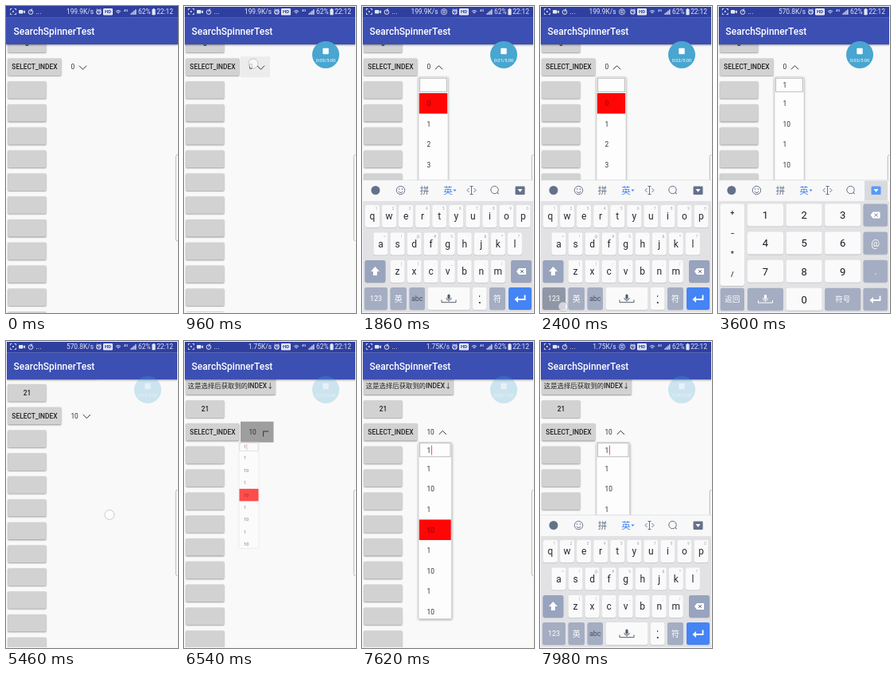
Animation of 216 by 384 pixels, one loop 8000 ms. Source, as an HTML page with a canvas:

```html
<!DOCTYPE html>
<html lang="zh-CN">
<head>
<meta charset="utf-8">
<style>
html, body { margin: 0; width: 100%; height: 100%; overflow: hidden; background: #fafafa; }
canvas { display: block; width: 216px; height: 384px; }
</style>
</head>
<body>
<canvas id="stage"></canvas>
<script>
const W = 216, H = 384, LOOP = 8000;
const canvas = document.getElementById('stage');
const c = canvas.getContext('2d');
const dpr = window.devicePixelRatio || 1;
canvas.width = W * dpr;
canvas.height = H * dpr;

const FONT = 'Roboto, "Noto Sans CJK SC", "Noto Sans CJK", sans-serif';
const SLATE = '#65718a', KEY_GREY = '#a4adc2', KEY_DARK = '#98a3bd', BLUE = '#4484f4';

const ramp = (t, a, b) => Math.min(1, Math.max(0, (t - a) / (b - a)));
const ease = p => 1 - (1 - p) ** 2;
const smooth = p => p * p * (3 - 2 * p);

function rect(x, y, w, h, color) {
  c.fillStyle = color;
  c.fillRect(x, y, w, h);
}
function round(x, y, w, h, r, color) {
  c.fillStyle = color;
  c.beginPath();
  c.roundRect(x, y, w, h, r);
  c.fill();
}
function disc(x, y, r, color) {
  c.fillStyle = color;
  c.beginPath();
  c.arc(x, y, r, 0, 7);
  c.fill();
}
function ring(x, y, r, color, width = 1) {
  c.strokeStyle = color;
  c.lineWidth = width;
  c.beginPath();
  c.arc(x, y, r, 0, 7);
  c.stroke();
}
function line(color, width, ...pts) {
  c.strokeStyle = color;
  c.lineWidth = width;
  c.beginPath();
  for (let i = 0; i < pts.length; i += 2) c.lineTo(pts[i], pts[i + 1]);
  c.stroke();
}
function shape(color, ...pts) {
  c.fillStyle = color;
  c.beginPath();
  for (let i = 0; i < pts.length; i += 2) c.lineTo(pts[i], pts[i + 1]);
  c.fill();
}
// y is the vertical centre of capital letters
function text(s, x, y, size, color, align = 'center', weight = 400) {
  c.font = `${weight} ${size}px ${FONT}`;
  c.fillStyle = color;
  c.textAlign = align;
  c.fillText(s, x, y + size * 0.355);
}
function shadowed(blur, dy, draw) {
  c.save();
  c.shadowColor = 'rgba(0,0,0,.4)';
  c.shadowBlur = blur * dpr;
  c.shadowOffsetY = dy * dpr;
  draw();
  c.restore();
}

function button(label, y, w = 48) {
  shadowed(1.6, 0.8, () => round(2.4, y - 10.8, w, 21.6, 1.2, '#d2d2d2'));
  if (label) text(label, 2.4 + w / 2, y, 8.4, '#222', 'center', 500);
}

function content(t, s) {
  button('这是选择后获取到的INDEX↓', s.scroll + 18.7, 112.5);
  button(s.picked ? '21' : '0', s.scroll + 47.5);
  button('SELECT_INDEX', s.scroll + 76.2, 67);
  for (let i = 0; i < 11; i++) button('', s.scroll + 105 + i * 28.8);
  spinner(t, s);
}

function spinner(t, s) {
  const y = s.scroll + 76.2;
  const press = t < 3000
    ? 0.05 * ramp(t, 900, 940) + 0.3 * ramp(t, 970, 1080) - 0.35 * ramp(t, 1100, 1350)
    : 0.05 * ramp(t, 6360, 6400) + 0.32 * ramp(t, 6430, 6520) - 0.37 * ramp(t, 6560, 6800);
  if (press > 0) rect(71, y - 13, s.width, 26, `rgba(0,0,0,${press})`);
  text(s.picked ? '10' : '0', 81.4, y, 8.4, '#333', 'left');
  const turn = ramp(t, 1040, 1160) - ramp(t, 4340, 4460) + ramp(t, 6450, 6570);
  c.save();
  c.translate(s.picked ? 101.3 : 96.5, y + 0.8);
  c.rotate(turn * Math.PI);
  line('#333', 1, -4.6, -2.3, 0, 2.3, 4.6, -2.3);
  c.restore();
}

function popup(t, s) {
  if (s.open <= 0) return;
  const x = 71, y = s.scroll + 89, w = s.width;
  const closing = t > 4300 && t < 4600;
  const scale = closing ? 1 : 0.5 + 0.5 * s.open;
  const h = Math.min(y + 221, s.kbTop) - y;
  const filtered = t > 2950;
  c.save();
  c.globalAlpha = closing ? s.open : Math.min(1, 3.5 * s.open);
  c.translate(x - 5 * (1 - scale), y);
  c.scale(scale, scale);
  // the shadow ignores the transform, so it is drawn only at full size
  if (scale === 1) shadowed(3, 1, () => rect(0, 0, w, h, '#fdfdfd'));
  else rect(0, 0, w, h, '#fdfdfd');
  c.strokeStyle = '#ccc';
  c.lineWidth = 0.6;
  c.strokeRect(0, 0, w, h);
  c.beginPath();
  c.rect(0, 0, w, h);
  c.clip();
  c.strokeStyle = '#aaa';
  c.lineWidth = 0.8;
  c.strokeRect(1.5, 1.2, w - 3, 17);
  if (filtered) text('1', 10.5, 10, 8.4, '#333', 'left');
  const blinkStart = t > 7600 ? 7600 : 6480;
  if (t > 6000 && Math.floor((t - blinkStart) / 500) % 2 === 0)
    rect(16, 4, 0.9, 12, '#f0406a');
  for (let i = 0; i < 8; i++) {
    const top = 20 + i * 25.6;
    const selected = filtered ? s.picked && i === 3 : i === 0;
    if (selected) rect(0.8, top, w - 1.6, 25.6, '#ff0606');
    const label = filtered ? (i % 2 ? '10' : '1') : String(i);
    text(label, 10.5, top + 13.3, 8.4, selected ? '#701010' : '#333', 'left');
  }
  c.restore();
}

function imeIcon(x, ink) {
  ring(x, 7.2, 3.6, ink, 0.8);
  rect(x - 2, 5.4, 4, 1, ink);
  rect(x - 2, 7.6, 4, 1, ink);
}

function bars(t, s) {
  shadowed(2, 1, () => rect(0, 14.5, W, 33.5, '#3c4fb3'));
  rect(0, 0, W, 14.6, '#2f3f9f');
  text('SearchSpinnerTest', 9.6, 31.6, 12, '#fff', 'left', 500);

  const ink = '#e3e6f5';
  for (const [sx, sy] of [[-1, -1], [1, -1], [1, 1], [-1, 1]])
    line(ink, 0.9, 9 + sx * 3.5, 7 + sy * 1.6, 9 + sx * 3.5, 7 + sy * 3.5, 9 + sx * 1.6, 7 + sy * 3.5);
  disc(9, 7, 1, ink);
  round(16, 5, 5.5, 4.6, 1, ink);
  shape(ink, 21.5, 7.2, 24, 5.2, 24, 9.4);
  ring(31, 7.6, 2.8, ink, 1);
  line(ink, 0.9, 31, 7.6, 32.5, 3.4);
  text('...', 37.5, 7, 9, ink, 'left');

  const speed = t < 3000 ? '199.9K/s' : t < 6000 ? '570.8K/s' : '1.75K/s';
  text(speed, s.typing ? 95.5 : 110, 7.2, 8.4, ink, 'right');
  if (s.typing) imeIcon(103, ink);
  ring(116.5, 7.4, 2.6, ink, 1.2);
  line(ink, 0.8, 116.5, 5.8, 116.5, 7.6, 117.8, 7.6);
  line(ink, 1, 113.4, 5, 114.8, 3.7);
  line(ink, 1, 118.2, 3.7, 119.6, 5);
  round(122, 3, 12, 8.5, 1.2, ink);
  text('HD', 128, 7.3, 6, '#2f3f9f', 'center', 700);
  for (const r of [1.4, 3, 4.5]) {
    c.strokeStyle = ink;
    c.lineWidth = 0.8;
    c.beginPath();
    c.arc(141, 10, r, Math.PI * 1.25, Math.PI * 1.75);
    c.stroke();
  }
  text('4G', 150.5, 5.4, 4.4, ink, 'center', 500);
  for (let i = 0; i < 4; i++) rect(156.5 + i * 1.9, 9 - i * 1.6, 1.3, 1.8 + i * 1.6, ink);
  text('62%', 166, 7.2, 8.4, ink, 'left');
  round(183.4, 4, 4.2, 7.2, 0.6, ink);
  rect(184.6, 3, 1.8, 1.2, ink);
  text('22:12', 210, 7.2, 8.4, ink, 'right');
}

function edgeHandle() {
  c.fillStyle = '#fff';
  c.strokeStyle = '#a5a5a5';
  c.lineWidth = 0.8;
  c.beginPath();
  c.roundRect(213.3, 186, 8, 108, 2.5);
  c.fill();
  c.stroke();
}

function key(x, y, w, color = '#fafafa', label = '', ink = '#252a33', size = 11) {
  round(x, y + 0.8, w, 28, 2.4, '#c2c3c8');
  round(x, y, w, 28, 2.4, color);
  if (label) text(label, x + w / 2, y + 14.2, size, ink);
}
function backspace(x, y) {
  shape('#fff', x - 6, y, x - 3, y - 4, x + 6, y - 4, x + 6, y + 4, x - 3, y + 4);
  line(SLATE, 1, x - 1, y - 1.8, x + 3, y + 1.8);
  line(SLATE, 1, x - 1, y + 1.8, x + 3, y - 1.8);
}
function enter(x, y) {
  line('#fff', 1.8, x + 6, y - 4.5, x + 6, y + 1, x - 4, y + 1);
  shape('#fff', x - 7, y + 1, x - 2.5, y - 3, x - 2.5, y + 5);
}
function mic(x, y, color) {
  round(x - 1.6, y - 5, 3.2, 6.2, 1.6, color);
  c.strokeStyle = color;
  c.lineWidth = 0.9;
  c.beginPath();
  c.arc(x, y - 0.6, 3.2, 0, Math.PI);
  c.stroke();
  line(color, 0.9, x, y + 2.6, x, y + 4);
  line(color, 1, x - 9, y + 2, x - 9, y + 5.2, x + 9, y + 5.2, x + 9, y + 2);
}

function toolbar(t) {
  rect(0, 218, W, 26, '#f8f8f9');
  rect(0, 217.5, W, 0.7, '#d8d9dd');
  disc(17, 230.5, 5.5, SLATE);
  ring(48.5, 230.5, 5.2, SLATE);
  disc(46.6, 229, 0.8, SLATE);
  disc(50.4, 229, 0.8, SLATE);
  c.beginPath();
  c.arc(48.5, 231, 2.6, 0.3, Math.PI - 0.3);
  c.stroke();
  text('拼', 78.5, 230.5, 11.5, SLATE);
  text('英', 108, 230.5, 11.5, BLUE);
  shape(BLUE, 114.5, 229.5, 118.5, 229.5, 116.5, 232);
  line(SLATE, 1, 135.5, 225.5, 139.5, 225.5);
  line(SLATE, 1, 137.5, 225.5, 137.5, 235.5);
  line(SLATE, 1, 135.5, 235.5, 139.5, 235.5);
  line(SLATE, 1, 134.5, 228, 132, 230.5, 134.5, 233);
  line(SLATE, 1, 140.5, 228, 143, 230.5, 140.5, 233);
  ring(166.5, 230, 4.7, SLATE);
  line(SLATE, 1.1, 169.8, 233.4, 171.6, 235.2);
  const pressed = t > 3470 && t < 3680;
  if (pressed) rect(184, 218.5, 29, 25, '#d9dade');
  round(192.5, 225.5, 12, 10.5, 1.2, pressed ? '#5a9af5' : SLATE);
  shape('#fff', 195.5, 229, 201.5, 229, 198.5, 232.8);
}

function letterKeys(t) {
  const rows = [
    ['qwertyuiop', '1234567890', 13, 249],
    ['asdfghjkl', '~!@#%\'&*?', 23.5, 283.5],
    ['zxcvbnm', '()-_:;/', 44.5, 318]
  ];
  for (const [letters, hints, x0, y] of rows)
    [...letters].forEach((letter, i) => {
      const x = x0 + i * 21.05;
      key(x - 9, y, 18);
      text(letter, x, y + 14.2, 12, '#252a33');
      text(hints[i], x + 5, y + 4.5, 4.5, '#9aa1ad');
    });
  key(3.5, 318, 26, KEY_DARK);
  shape('#fff', 16.5, 326, 22, 332, 19, 332, 19, 337, 14, 337, 14, 332, 11, 332);
  key(187, 318, 26, KEY_DARK);
  backspace(200, 332);
  key(3, 352, 29, t > 2330 && t < 2460 ? '#8f97a6' : KEY_GREY, '123', '#fff', 9);
  key(35.5, 352, 20.5, KEY_GREY, '英', '#fff', 10);
  key(59.5, 352, 19.5, KEY_GREY, 'abc', '#4a5162', 9);
  key(82.5, 352, 53);
  mic(109, 365.5, '#555d6b');
  key(139, 352, 17.5);
  text('.', 147.8, 367, 13, '#252a33', 'center', 700);
  text(',', 147.8, 360, 8, '#252a33', 'center', 700);
  key(160, 352, 20, KEY_GREY, '符', '#fff', 10);
  key(184, 352, 29, BLUE);
  enter(198.5, 366);
}

function digitKeys(t) {
  const rowY = i => 247.5 + i * 35.1;
  round(3, 248.5, 30, 102.5, 2.4, '#c2c3c8');
  round(3, 247.5, 30, 102.5, 2.4, '#fafafa');
  [...'+−*/'].forEach((s, i) => text(s, 18, 259 + i * 25.5, 9, '#1c2028', 'center', 500));
  for (let i = 0; i < 9; i++) {
    const hit = i === 0 && t > 2880 && t < 2980;
    key(37 + (i % 3) * 48.6, rowY(Math.floor(i / 3)), 45, hit ? '#d5d6da' : '#fafafa', String(i + 1), '#15181e', 13);
  }
  ['', '@', '.', ''].forEach((s, i) => key(182.5, rowY(i), 30.5, KEY_GREY, s, '#fff', 12));
  backspace(197.5, 261.5);
  enter(197.5, 367);
  key(3, rowY(3), 30, KEY_GREY, '返回', '#fff', 9.5);
  key(37, rowY(3), 45, KEY_GREY);
  mic(59.5, 366, '#fff');
  key(85.6, rowY(3), 45, '#fafafa', '0', '#15181e', 13);
  key(134.2, rowY(3), 45, KEY_GREY, '符号', '#fff', 9.5);
}

function keyboard(t, s) {
  if (s.kb <= 0) return;
  c.save();
  c.translate(0, s.kbTop - 218);
  rect(0, 218, W, 166, '#e2e2e5');
  toolbar(t);
  if (t > 2460 && t < 4500) digitKeys(t);
  else letterKeys(t);
  c.restore();
}

function recorder(t) {
  c.save();
  c.globalAlpha = ramp(t, 250, 450) * (1 - 0.08 * ramp(t, 4600, 4800) - 0.66 * ramp(t, 4800, 5300));
  disc(178, 61, 17, '#48a6d0');
  c.globalAlpha = Math.sqrt(c.globalAlpha);
  round(174.3, 52.8, 7.4, 7.4, 0.8, '#fff');
  const sec = Math.max(0, Math.floor((t - 20) / 950));
  text(`0:0${sec}/5:00`, 178, 67.6, 5.8, '#fff');
  c.restore();
}

function touches(t, s) {
  const taps = [
    [900, 1040, 87, 72], [1480, 1590, 88, 98], [2330, 2450, 29, 376],
    [2860, 2970, 60, 262], [3470, 3580, 198, 231], [4210, 4330, 88, 199],
    [5150, 5750, 130, 200 + s.scroll], [6340, 6440, 87, 111], [7480, 7600, 88, 136]
  ];
  for (const [from, to, x, y] of taps)
    if (t >= from && t < to) {
      disc(x, y, 6, 'rgba(255,255,255,.6)');
      ring(x, y, 6, 'rgba(120,120,120,.45)', 0.8);
    }
}

function draw(t) {
  const kb = ease(ramp(t, 1650, 1850)) - ease(ramp(t, 3660, 3860)) + ease(ramp(t, 7640, 7840));
  const s = {
    kb,
    picked: t > 4340,
    typing: (t > 1650 && t < 3580) || t > 7640,
    kbTop: 218 + 166 * (1 - kb),
    scroll: 37.6 * smooth(ramp(t, 5200, 5750)),
    open: ramp(t, 1060, 1310) - ramp(t, 4340, 4540) + ramp(t, 6490, 6740),
    width: t > 4540 ? 41.5 : 37
  };
  c.setTransform(dpr, 0, 0, dpr, 0, 0);
  rect(0, 0, W, H, '#f9f9f9');
  content(t, s);
  bars(t, s);
  popup(t, s);
  edgeHandle();
  keyboard(t, s);
  recorder(t);
  touches(t, s);
  if (t >= 60) {
    c.strokeStyle = '#f6f6fa';
    c.lineWidth = 1;
    c.strokeRect(0.5, 0.5, W - 1, H - 1);
  }
}

function tick() {
  draw(performance.now() % LOOP);
  requestAnimationFrame(tick);
}
tick();
</script>
</body>
</html>
```
